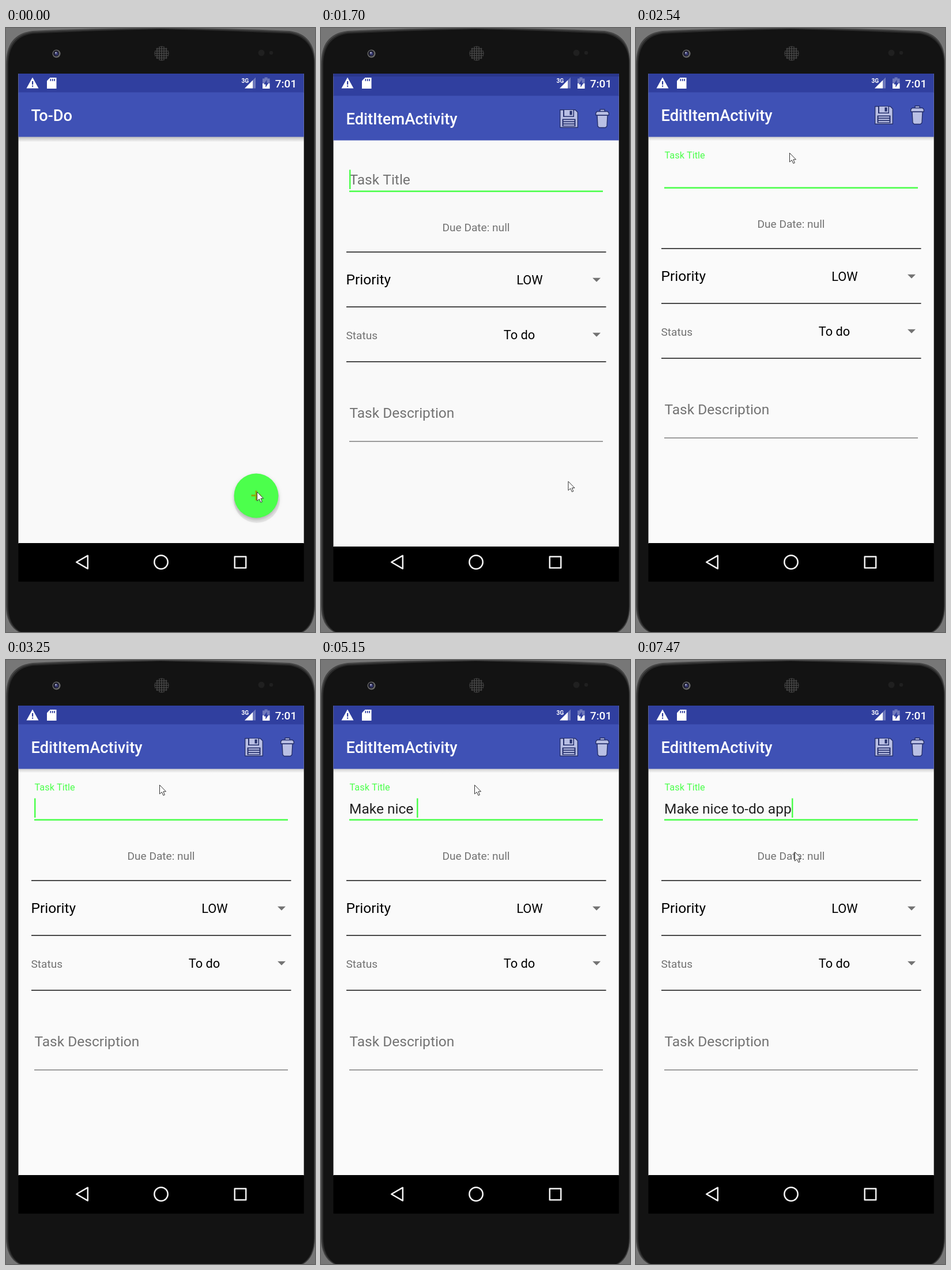
An HTML page with a canvas for the animation above (8 s loop, 536 by 1046 pixels).

```html
<!DOCTYPE html>
<html lang="en">
<head>
<meta charset="utf-8">
<title>To-Do</title>
<style>
html, body { margin: 0; width: 100%; height: 100%; overflow: hidden; background: #777; }
canvas { display: block; }
</style>
</head>
<body>
<canvas id="stage" width="536" height="1046"></canvas>
<script>
const LOOP = 8000;
const OPEN = 1700, SETTLED = 1860;
const BLINK = 525;
const SP = 1.363;
const LEFT = 21.5, WIDTH = 495.2;
const GREEN = '#4cff4c', GREY = '#737373', INDIGO = '#3f51b5', NIGHT = '#303f9f';
const ICON = '#b9bfe4', ICON_EDGE = '#242f6c';
const ctx = document.getElementById('stage').getContext('2d');

const WORDS = [
  { word: 'Make ', from: 3930, to: 4610 },
  { word: 'nice ', from: 4900, to: 5150 },
  { word: 'to-do ', from: 5300, to: 6150 },
  { word: 'app', from: 6300, to: 6420 }
];
const MOVES = [
  { from: OPEN, to: SETTLED, x: 340, y: 422 },
  { from: SETTLED, to: 2390, x: 238, y: 290 },
  { from: 2390, to: 2540, x: 266, y: 216 },
  { from: 7000, to: 7220, x: 275, y: 332 }
];

const progress = (t, a, b) => Math.min(1, Math.max(0, (t - a) / (b - a)));

function typedTitle(t) {
  let str = '', lastKey = OPEN;
  for (const { word, from, to } of WORDS) {
    if (t < from) break;
    str += word.slice(0, 1 + Math.round(progress(t, from, to) * (word.length - 1)));
    lastKey = Math.min(t, to);
  }
  return { str, caret: (t - lastKey) % (2 * BLINK) < BLINK };
}

function pointerAt(t) {
  if (t < OPEN) return [435, 803];
  let x = 429, y = 787;
  for (const m of MOVES) {
    const p = progress(t, m.from, m.to);
    x += (m.x - x) * p;
    y += (m.y - y) * p;
  }
  return [x, y];
}

function rect(x, y, w, h, color) {
  ctx.fillStyle = color;
  ctx.fillRect(x, y, w, h);
}

function band(y, h, color) {
  rect(LEFT, y, WIDTH, h, color);
}

function circle(x, y, r) {
  ctx.beginPath();
  ctx.arc(x, y, r, 0, Math.PI * 2);
}

function disc(x, y, r, color) {
  circle(x, y, r);
  ctx.fillStyle = color;
  ctx.fill();
}

function path(...points) {
  ctx.beginPath();
  for (let i = 0; i < points.length; i += 2) ctx.lineTo(points[i], points[i + 1]);
  ctx.closePath();
}

function poly(color, ...points) {
  path(...points);
  ctx.fillStyle = color;
  ctx.fill();
}

function outlined(...points) {
  path(...points);
  ctx.fill();
  ctx.stroke();
}

// size in scaled points
function text(str, x, y, size, color, weight = 400, align = 'left') {
  ctx.font = `${weight} ${size * SP}px Roboto, sans-serif`;
  ctx.textAlign = align;
  ctx.fillStyle = color;
  ctx.fillText(str, x, y);
}

function fade(y, h, alpha) {
  const g = ctx.createLinearGradient(0, y, 0, y + h);
  g.addColorStop(0, `rgba(0,0,0,${alpha})`);
  g.addColorStop(1, 'rgba(0,0,0,0)');
  band(y, h, g);
}

function shell(inset, color) {
  const r = 536 - inset / 2, top = inset * 1.2;
  ctx.beginPath();
  ctx.moveTo(inset, 64);
  ctx.bezierCurveTo(inset, 28 + top, 14 + inset, 9 + top, 46, 5 + top);
  ctx.quadraticCurveTo(150, top, 268, inset / 2);
  ctx.quadraticCurveTo(386, top, 492, 5 + top);
  ctx.bezierCurveTo(522 - inset, 9 + top, r, 28 + top, r, 60);
  ctx.lineTo(r, 1000);
  ctx.quadraticCurveTo(r, 1034, 516 - inset, 1046);
  ctx.lineTo(22 + inset, 1046);
  ctx.quadraticCurveTo(inset, 1034, inset, 1000);
  ctx.fillStyle = color;
  ctx.fill();
}

function phone() {
  rect(0, 0, 536, 1046, '#777');
  shell(0, '#444');
  shell(2, '#2a2a2a');
  shell(4, '#131313');

  disc(87.5, 44.5, 7, '#6a6a6a');
  disc(87, 44, 5.2, '#1c1c26');
  disc(87.5, 44.5, 3.2, '#34366c');
  disc(86.5, 43, 1.4, '#b5b7d0');

  disc(270, 44, 12.5, '#444');
  for (let y = -10; y <= 10; y += 4) {
    for (let x = -10; x <= 10; x += 4) {
      if (Math.hypot(x, y) < 12) disc(270 + x, 44 + y, 1.4, '#121212');
    }
  }
  disc(443, 43, 5.5, '#202020');
  disc(460, 43, 3.2, '#202020');
}

function navBar(top) {
  band(top, 958.7 - top, '#000');
  ctx.strokeStyle = '#f2f2f2';
  ctx.lineWidth = 2.5;
  ctx.lineJoin = 'round';
  path(122.2, 925, 141.8, 913.7, 141.8, 936.3);
  ctx.stroke();
  circle(269, 925, 11.7);
  ctx.stroke();
  ctx.strokeRect(396.7, 915.5, 19.5, 19.5);
}

function statusIcons() {
  const dim = 'rgba(255,255,255,.3)';
  poly('#fff', 35.5, 104.5, 46, 85.5, 56.5, 104.5);
  rect(45, 92, 2.2, 6, NIGHT);
  rect(45, 99.5, 2.2, 2.2, NIGHT);

  poly('#fff', 71, 91.5, 76.5, 86, 87.5, 86, 87.5, 105, 71, 105);
  for (let i = 0; i < 3; i++) rect(76.5 + i * 3.4, 88, 1.7, 4, NIGHT);

  text('3G', 408.5, 94.5, 7.4, '#fff', 700);
  poly(dim, 414, 104.5, 433, 85.5, 433, 104.5);
  poly('#fff', 414, 104.5, 428, 90.5, 428, 104.5);

  rect(448.5, 85.5, 5, 2, dim);
  rect(445, 87.5, 12.5, 8.5, dim);
  rect(445, 96, 12.5, 9, '#fff');
  poly(NIGHT, 452.5, 89.5, 447, 97.5, 450.3, 97.5, 450.3, 103, 455.5, 95, 452.5, 95);
  text('7:01', 466.7, 102.5, 14, '#fff', 500);
}

function header(title, dy) {
  band(79, 33 + dy, NIGHT);
  if (dy) band(79, dy - 1, '#2a378c');
  band(111.4 + dy, 77.2, INDIGO);
  statusIcons();
  text(title, 43.5, 161 + dy, 20, '#fff', 500);
}

function saveIcon(x, y) {
  ctx.save();
  ctx.translate(x, y);
  ctx.strokeStyle = ICON_EDGE;
  ctx.fillStyle = ICON;
  ctx.lineWidth = 1.4;
  outlined(.7, .7, 27, .7, 31.3, 5, 31.3, 31.3, .7, 31.3);
  rect(6, 1, 19, 12, ICON_EDGE);
  rect(8, 1, 15.5, 10.5, ICON);
  rect(17.5, 2.5, 4, 7, ICON_EDGE);
  rect(4.5, 16.5, 23, 13, ICON_EDGE);
  for (let i = 0; i < 3; i++) rect(6.5, 18.2 + i * 3.9, 19, 2.2, ICON);
  ctx.restore();
}

function trashIcon(x, y) {
  ctx.save();
  ctx.translate(x, y);
  ctx.strokeStyle = ICON_EDGE;
  ctx.fillStyle = ICON;
  ctx.lineWidth = 1.4;
  ctx.lineJoin = 'round';
  outlined(8, 5, 8, 1, 16, 1, 16, 5);
  outlined(3, 11, 21, 11, 20, 30, 17.5, 32.5, 6.5, 32.5, 4, 30);
  outlined(.7, 11, .7, 7, 3, 4.5, 21, 4.5, 23.3, 7, 23.3, 11);
  ctx.restore();
}

function listScreen(t) {
  band(79, 814, '#f9f9f9');
  header('To-Do', 0);
  fade(188.6, 9, .24);
  navBar(892);

  disc(435, 817, 40, 'rgba(0,0,0,.07)');
  ctx.save();
  ctx.shadowColor = 'rgba(0,0,0,.25)';
  ctx.shadowBlur = 6;
  ctx.shadowOffsetY = 3;
  disc(434, 810, 38.5, t < 1150 ? GREEN : '#48e848');
  ctx.restore();
  rect(425.5, 808, 17, 3.2, '#86b010');
  rect(432.4, 801, 3.2, 17, '#86b010');
}

function spinner(value, center, y) {
  text(value, center, y + 8, 16, '#000', 400, 'center');
  poly(GREY, 471, y - 3.2, 485, y - 3.2, 478, y + 3.8);
}

function titleField(t) {
  if (t < SETTLED) text('Task Title', 49.5, 264.5, 18, GREY);
  else text('Task Title', 49.5, 225.5, 12, GREEN);

  const { str, caret } = typedTitle(t);
  text(str, 49, 266, 18, '#212121');
  if (caret) rect(Math.round(49 + ctx.measureText(str).width), 239.5, 2.5, 33.5, GREEN);
  rect(49, 275.5, 440, 2.6, GREEN);
}

function editScreen(t) {
  const dy = t < SETTLED ? 6 : 0;
  band(79, 814 + dy, dy ? '#f9f9f9' : '#fafafa');
  header('EditItemActivity', dy);
  saveIcon(414, 135 + dy);
  trashIcon(476, 134 + dy);
  if (!dy) fade(188.6, 7, .17);
  navBar(892 + dy);

  ctx.save();
  ctx.translate(0, dy);
  titleField(t);
  text('Due Date: null', 269, 346, 14, GREY, 400, 'center');
  for (let i = 0; i < 3; i++) rect(44, 381.2 + i * 95, 450.5, 1.5, '#111');

  text('Priority', 43.5, 438, 18, '#000');
  spinner('LOW', 362, 430);
  text('Status', 43.5, 532.5, 14, GREY);
  spinner('To do', 344, 525);

  text('Task Description', 49.5, 668.5, 18, GREY);
  rect(49, 709.2, 440, 1.4, '#757575');
  ctx.restore();
}

function pointer(t) {
  const [x, y] = pointerAt(t);
  ctx.save();
  ctx.translate(x + .5, y + .5);
  ctx.fillStyle = '#fff';
  ctx.strokeStyle = '#333';
  ctx.lineWidth = 1;
  ctx.lineJoin = 'round';
  outlined(0, 0, 0, 15.5, 3.8, 12.2, 6.4, 18, 8.8, 17, 6.4, 11.3, 11, 11.3);
  ctx.restore();
}

function draw(t) {
  phone();
  if (t < OPEN) listScreen(t);
  else editScreen(t);
  pointer(t);
}

const start = performance.now();
function tick() {
  draw((performance.now() - start) % LOOP);
  requestAnimationFrame(tick);
}
tick();
</script>
</body>
</html>
```
